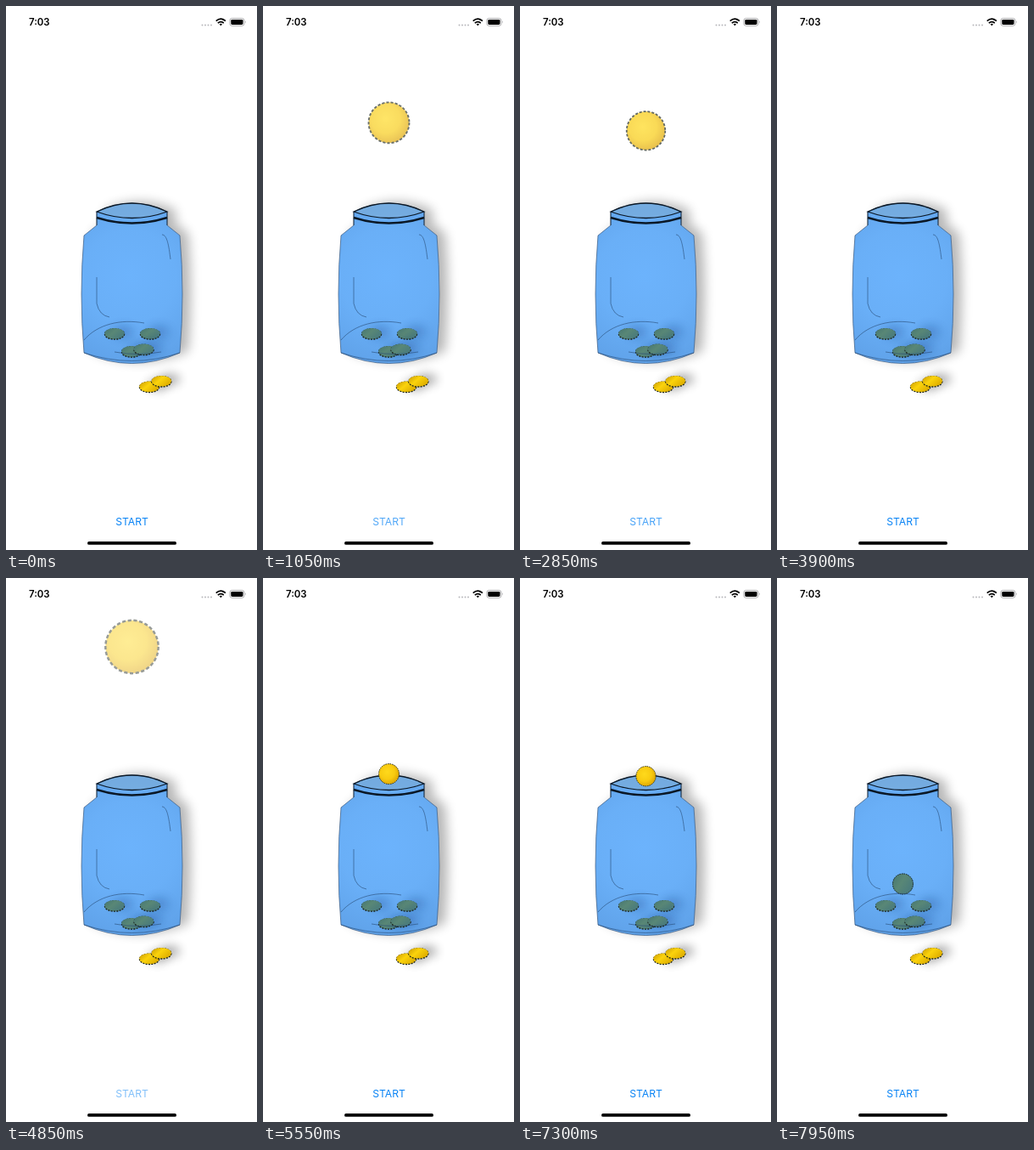
An HTML page that plays this animation: 296 px wide and 640 px high, repeating every 8000 ms.

```html
<!DOCTYPE html>
<html lang="en">
<head>
<meta charset="utf-8">
<title>Coin jar</title>
<style>
  html, body { margin: 0; width: 100%; height: 100%; overflow: hidden; background: #fff; }
  svg { display: block; width: 100vw; height: 100vh; }
  text { font-family: Inter, Roboto, sans-serif; }
  .rim { fill: none; stroke: #0b1826; }
  .line { fill: none; stroke: #274a74; stroke-width: .6; }
</style>
</head>
<body>
<svg viewBox="0 0 296 640">
  <defs>
    <radialGradient id="gold" cx=".42" cy=".4" r=".65">
      <stop offset="0" stop-color="#ffd91c"/>
      <stop offset=".55" stop-color="#f8cb10"/>
      <stop offset="1" stop-color="#dca200"/>
    </radialGradient>
    <linearGradient id="flatGold" x2="1" y2=".6">
      <stop offset="0" stop-color="#c99a00"/>
      <stop offset=".5" stop-color="#fbd30c"/>
      <stop offset="1" stop-color="#e0b000"/>
    </linearGradient>
    <linearGradient id="green" x2="1" y2=".6">
      <stop offset="0" stop-color="#467671"/>
      <stop offset=".5" stop-color="#598776"/>
      <stop offset="1" stop-color="#4a7b7c"/>
    </linearGradient>
    <radialGradient id="glass" gradientUnits="userSpaceOnUse" cx="146" cy="318" r="110">
      <stop offset="0" stop-color="#0a80fa" stop-opacity=".6"/>
      <stop offset=".5" stop-color="#0a7cf2" stop-opacity=".61"/>
      <stop offset="1" stop-color="#086edb" stop-opacity=".65"/>
    </radialGradient>
    <filter id="blur" x="-50%" y="-50%" width="200%" height="200%"><feGaussianBlur stdDeviation="6.5"/></filter>
    <filter id="soft" x="-150%" y="-250%" width="400%" height="600%"><feGaussianBlur stdDeviation="6"/></filter>
    <path id="jar" d="M107 242Q148.500 222 190 242V258L205 270Q211 339 205 408Q148.500 433 92 408Q86 339 92 270L107 258Z"/>
    <clipPath id="inside"><use href="#jar"/></clipPath>
    <circle id="disc" r="12" stroke="#222a22" stroke-width=".95" stroke-dasharray="1.6 1"/>
  </defs>

  <rect width="296" height="640" fill="#fff"/>
  <use href="#jar" transform="translate(10 -2)" opacity=".28" filter="url(#blur)"/>
  <use href="#jar" fill="#fff"/>
  <g id="behind"></g>
  <use href="#jar" fill="url(#glass)"/>
  <g clip-path="url(#inside)">
    <g id="within"></g>
    <g id="saved"></g>
  </g>

  <use href="#jar" fill="none" stroke="#35567f" stroke-width=".7"/>
  <path class="line" d="M92 408Q148.500 427 205 408"/>
  <path class="line" d="M107 319V350Q110 364 122 366"/>
  <path class="line" d="M184 269C190 269 192 282 194 298"/>
  <path class="line" d="M92 393C108 374 136 368 163 373"/>
  <path class="line" d="M128 407Q154 412 183 407"/>
  <path d="M107 242Q148.500 222 190 242Q148.500 257 107 242Z" fill="#7fadd6" fill-opacity=".6" stroke="#0b1826" stroke-width="1.3"/>
  <path class="rim" d="M107 249Q148.500 262 190 249" stroke-width="2.6"/>
  <path class="rim" d="M107 242V258M190 242V258" stroke-width=".7"/>
  <g id="spare"></g>
  <g id="front"></g>

  <text x="27" y="23" font-size="11.4" font-weight="600">7:03</text>
  <g fill="#b9b9bd">
    <circle cx="231.500" cy="22.400" r="1"/><circle cx="235" cy="22.400" r="1"/>
    <circle cx="238.500" cy="22.400" r="1"/><circle cx="242" cy="22.400" r="1"/>
  </g>
  <g fill="none" stroke="#000" stroke-width="1.7">
    <path d="M247.700 17.700Q253.300 12.700 258.900 17.700"/>
    <path d="M249.800 20.100Q253.300 17.100 256.800 20.100"/>
    <path d="M251.600 21.400Q253.300 20 255 21.400L253.300 23.300Z" fill="#000" stroke="none"/>
  </g>
  <rect x="263.900" y="14.500" width="17" height="8.800" rx="2.500" fill="none" stroke="#a5a5a8" stroke-width=".9"/>
  <rect x="265.300" y="15.900" width="14.200" height="6" rx="1.400"/>
  <path d="M282 17.300Q283.500 18.900 282 20.500Z" fill="#a5a5a8"/>
  <text id="start" x="148.500" y="611" font-size="12.2" text-anchor="middle" fill="#0a84f5">START</text>
  <rect x="96" y="630" width="105" height="3.800" rx="1.900"/>
</svg>
<script>
const LOOP = 8000, DROP = 830, GONE = 1225, FADE = 300;
const TOP = -50, MOUTH = 230.5, FLOOR = 363.5, X = 148.5;
const taps = [[850, 875], [2600, 2665], [4600, 4725], [6650, 6784]]; // press, release
const $ = id => document.getElementById(id);
const mix = (a, b, p) => a + (b - a) * p;

// Slightly underdamped spring from 0 to 1
function spring(ms) {
  if (ms <= 0) return 0;
  const t = ms / 1000, w = 2 * Math.PI / .55, z = .825;
  const d = w * Math.sqrt(1 - z * z);
  return 1 - Math.exp(-z * w * t) * (Math.cos(d * t) + z * w / d * Math.sin(d * t));
}

function flatCoin(fill, shade) {
  return ([x, y]) => `<g transform="translate(${x} ${y})">
    <ellipse cx="10" cy="-2" rx="12" ry="7" fill="${shade}" opacity=".3" filter="url(#soft)"/>
    <ellipse cy=".5" rx="11.600" ry="6.200" fill="${fill}" stroke="#1c241c" stroke-width="1.300" stroke-dasharray="2 1.300"/>
    <ellipse cy="-.4" rx="11.600" ry="6" fill="${fill}"/></g>`;
}
$('saved').innerHTML = [[128, 385.5], [170, 385.5], [148, 406.5], [162.5, 404]].map(flatCoin('url(#green)', '#0a3a80')).join('');
$('spare').innerHTML = [[169, 447.8], [183.3, 441.3]].map(flatCoin('url(#flatGold)', '#000')).join('');
const layers = { behind: 'gold', within: 'green', front: 'gold' };
for (const id in layers) $(id).innerHTML = `<use href="#disc" fill="url(#${layers[id]})"/>`;

function place(id, shown, y, scale, alpha) {
  const g = $(id);
  g.style.display = shown ? '' : 'none';
  g.setAttribute('transform', `translate(${X} ${y}) scale(${scale})`);
  g.setAttribute('opacity', alpha);
}

function draw(now) {
  const time = now % LOOP;
  const [press, release] = taps.filter(tap => tap[0] <= time).pop() || [-LOOP, -LOOP];
  const t = time - release;
  const f = Math.min(1, Math.max(0, t / FADE));
  $('start').setAttribute('opacity', mix(.2, 1, f * f * (3 - 2 * f)));

  const p = spring(t), falling = t >= DROP, live = t >= 0 && t < GONE;
  const y = falling ? mix(MOUTH, FLOOR, spring(t - DROP)) : mix(TOP, MOUTH, p);
  const scale = falling ? 1 : mix(4, 1, p), alpha = Math.min(1, p);
  place('front', live && !falling, y, scale, alpha);
  place('behind', live && falling, y, 1, 1);
  place('within', live && falling, y, 1, 1);
}

const begin = performance.now();
function tick() {
  draw(performance.now() - begin);
  requestAnimationFrame(tick);
}
tick();
</script>
</body>
</html>
```
